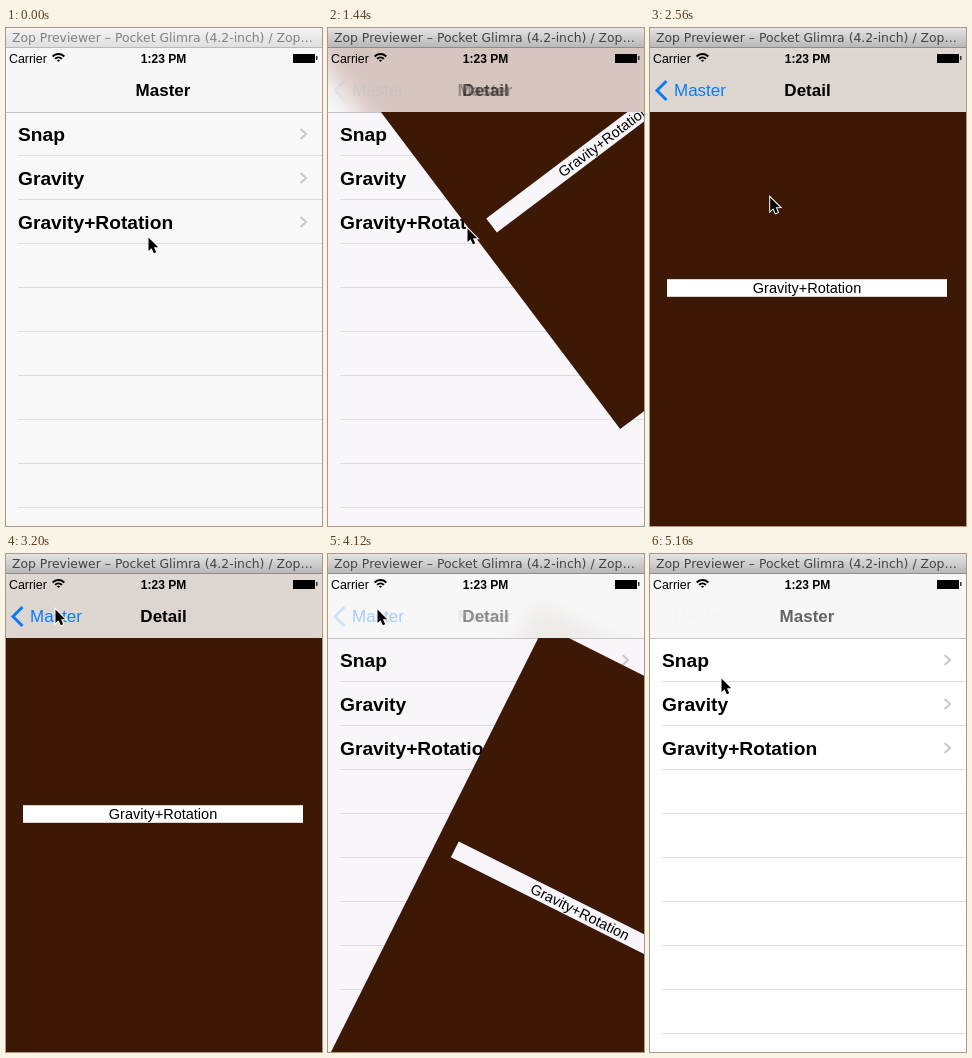
An HTML page with a canvas that plays this animation: 316x498 px, repeating every 5.2 s.

```html
<!DOCTYPE html>
<html lang="en">
<head>
<meta charset="utf-8">
<title>Hinged screen transition</title>
<style>
html, body { margin: 0; width: 100%; height: 100%; overflow: hidden; }
canvas { display: block; }
</style>
</head>
<body>
<canvas id="stage" width="316" height="498"></canvas>
<script>
const ctx = document.getElementById('stage').getContext('2d');
const W = 316, H = 498, LOOP = 5200, STEP = 40;
const PUSH = 544, POP = 3341;
const SANS = '"Liberation Sans", Arial, sans-serif';
const BLUE = '#087cf8', BROWN = '#3c1805';

const PAPER = [[0, '#f8f8f8'], [1320, '#f8f6fa'], [1880, '#fff'],
               [3560, '#fefbf4'], [4120, '#f8f6fa'], [4680, '#fff']];
const CURSOR_X = [[0, 142], [200, 139], [2440, 139], [3000, 49], [4720, 49], [5160, 71]];
const CURSOR_Y = [[0, 209], [200, 200], [2440, 200], [3000, 55], [4720, 55], [5160, 124]];
const MASTER = [[PUSH, 1], [1440, .3], [2050, 0], [3950, 0], [4360, .14], [5160, .6]];
const DETAIL = [[PUSH, 0], [2050, 1], [POP, 1], [3880, .6], [4360, .25], [4640, 0]];
const BACK = [[1200, 0], [1440, .06], [1920, .17], [2080, 1], [POP, 1],
              [3880, .55], [4360, .12], [5160, .02]];
const CHEVRON = [[1200, 0], [1440, .06], [1920, .25], [2080, 1], [POP, 1],
                 [3880, .25], [4360, .08], [5160, 0]];
const TINT = [[PUSH, .1], [1440, .24], [1920, .3], [POP, .3], [3880, .17], [4680, 0]];

// Linear interpolation through [time, value] pairs
function key(t, keys) {
  if (t <= keys[0][0]) return keys[0][1];
  for (let i = 1; i < keys.length; i++) {
    const [t0, a] = keys[i - 1], [t1, b] = keys[i];
    if (t < t1) return a + (b - a) * (t - t0) / (t1 - t0);
  }
  return keys[keys.length - 1][1];
}

// Rigid body falling about a corner hinge; side is -1 for a top hinge, 1 for a bottom one
function fall(ms, angle, side) {
  const dt = .001, limit = side < 0 ? 0 : Math.PI / 2;
  let speed = 0;
  for (let s = 0; s < ms / 1000 && angle < limit; s += dt) {
    speed += .00863 * (160 * Math.cos(angle) + side * 250 * Math.sin(angle)) * dt;
    angle += speed * dt;
  }
  return Math.min(angle, limit);
}

function text(str, x, y, font, color = '#000', align = 'left', alpha = 1) {
  ctx.globalAlpha = alpha;
  ctx.font = font;
  ctx.fillStyle = color;
  ctx.textAlign = align;
  ctx.fillText(str, x, y);
  ctx.globalAlpha = 1;
}

function rect(x, y, w, h, fill) {
  ctx.fillStyle = fill;
  ctx.fillRect(x, y, w, h);
}

function polyline(points, color, width) {
  ctx.beginPath();
  points.forEach(([x, y]) => ctx.lineTo(x, y));
  ctx.strokeStyle = color;
  ctx.lineWidth = width;
  ctx.stroke();
}

function gradient(top, bottom) {
  const g = ctx.createLinearGradient(0, 0, 0, 20);
  g.addColorStop(0, top);
  g.addColorStop(1, bottom);
  return g;
}

function drawList(paper) {
  rect(0, 0, W, H, paper);
  rect(0, 84, W, 1, '#c4c4c4');
  for (let y = 127; y < H; y += 44) rect(12, y, W - 12, 1, '#dcdbdd');
  ['Snap', 'Gravity', 'Gravity+Rotation'].forEach((name, i) => {
    const y = 106 + 44 * i;
    text(name, 12, y + 7, 'bold 19.2px ' + SANS);
    polyline([[294.5, y - 5], [300, y], [294.5, y + 5]], '#c7c7cc', 2);
  });
}

function placePanel(t, paint) {
  const popping = t >= POP;
  const angle = popping ? fall(t - POP, 0, 1) : fall(t - PUSH, -Math.PI / 2, -1);
  ctx.save();
  ctx.translate(-3, popping ? 510 : 10);
  ctx.rotate(angle);
  ctx.translate(0, popping ? -250 : 250);
  paint();
  ctx.restore();
}

function drawPanel(t, paper) {
  placePanel(t, () => {
    rect(0, -240, 320, 480, BROWN);
    rect(20, -8.8, 280, 17.6, paper);
    text('Gravity+Rotation', 160, 5, '14.5px ' + SANS, '#000', 'center');
  });
}

// The panel shows through the bar as a blurred tint, grown so the bar's ends stay even
function drawTint(t) {
  const mix = (a, b) => key(t, [[1920, a], [2080, b]]);
  const color = `rgba(${mix(115, 161)},${mix(41, 135)},${mix(15, 115)},${key(t, TINT)})`;
  ctx.save();
  ctx.beginPath();
  ctx.rect(0, 20, W, 64);
  ctx.clip();
  ctx.filter = 'blur(12px)';
  placePanel(t, () => rect(-16, -256, 352, 512, color));
  ctx.restore();
}

function drawBar(t, panelShown) {
  rect(0, 20, W, 64, '#f7f7f7');
  if (panelShown) drawTint(t);
  text('Master', 157, 68, 'bold 17px ' + SANS, '#000', 'center', key(t, MASTER));
  text('Detail', 157.5, 68, 'bold 17px ' + SANS, '#000', 'center', key(t, DETAIL));
  text('Master', 24, 68, '17px ' + SANS, BLUE, 'left', key(t, BACK));
  ctx.globalAlpha = key(t, CHEVRON);
  polyline([[16.5, 53], [7, 62.5], [16.5, 72]], BLUE, 3);
  ctx.globalAlpha = 1;
}

function drawStatus() {
  text('Carrier', 3, 35, '12.4px ' + SANS);
  text('1:23 PM', 157.5, 35, 'bold 12px ' + SANS, '#000', 'center');
  for (const r of [1.2, 4.6, 8]) {
    ctx.beginPath();
    ctx.arc(52.5, 34, r, -Math.PI * .76, -Math.PI * .24);
    ctx.strokeStyle = '#000';
    ctx.lineWidth = 2;
    ctx.stroke();
  }
  rect(287, 26, 22, 9, '#000');
  rect(310, 28, 1.5, 4, '#333');
}

function drawWindowTitle(active) {
  rect(0, 0, W, 20, active ? gradient('#e4e4e4', '#b6b6b6') : gradient('#f4f4f4', '#dedede'));
  rect(0, 19, W, 1, active ? '#8c8c8c' : '#b8b8b8');
  text('Zop Previewer – Pocket Glimra (4.2-inch) / Zop…', 6, 14,
    '12.4px "DejaVu Sans", sans-serif', active ? '#444' : '#828282');
}

function drawCursor(x, y) {
  ctx.save();
  ctx.translate(x, y);
  ctx.beginPath();
  [[.5, .5], [.5, 14], [3.6, 11.2], [5.8, 16.3], [8.2, 15.3], [6, 10.3], [10.2, 10.2]]
    .forEach(([px, py]) => ctx.lineTo(px, py));
  ctx.closePath();
  ctx.strokeStyle = '#fff';
  ctx.lineWidth = 2;
  ctx.stroke();
  ctx.fillStyle = '#000';
  ctx.fill();
  ctx.restore();
}

function draw(t) {
  const paper = PAPER.filter(([start]) => start <= t).pop()[1];
  const panelShown = t >= 740 && t < 4680;
  drawList(paper);
  if (panelShown) drawPanel(t, paper);
  drawBar(t, panelShown);
  drawStatus();
  drawWindowTitle(t >= 760);
  drawCursor(key(t, CURSOR_X), key(t, CURSOR_Y));
}

const begin = performance.now();
function tick() {
  const t = (performance.now() - begin) % LOOP;
  draw(Math.floor(t / STEP) * STEP);
  requestAnimationFrame(tick);
}
tick();
</script>
</body>
</html>
```
